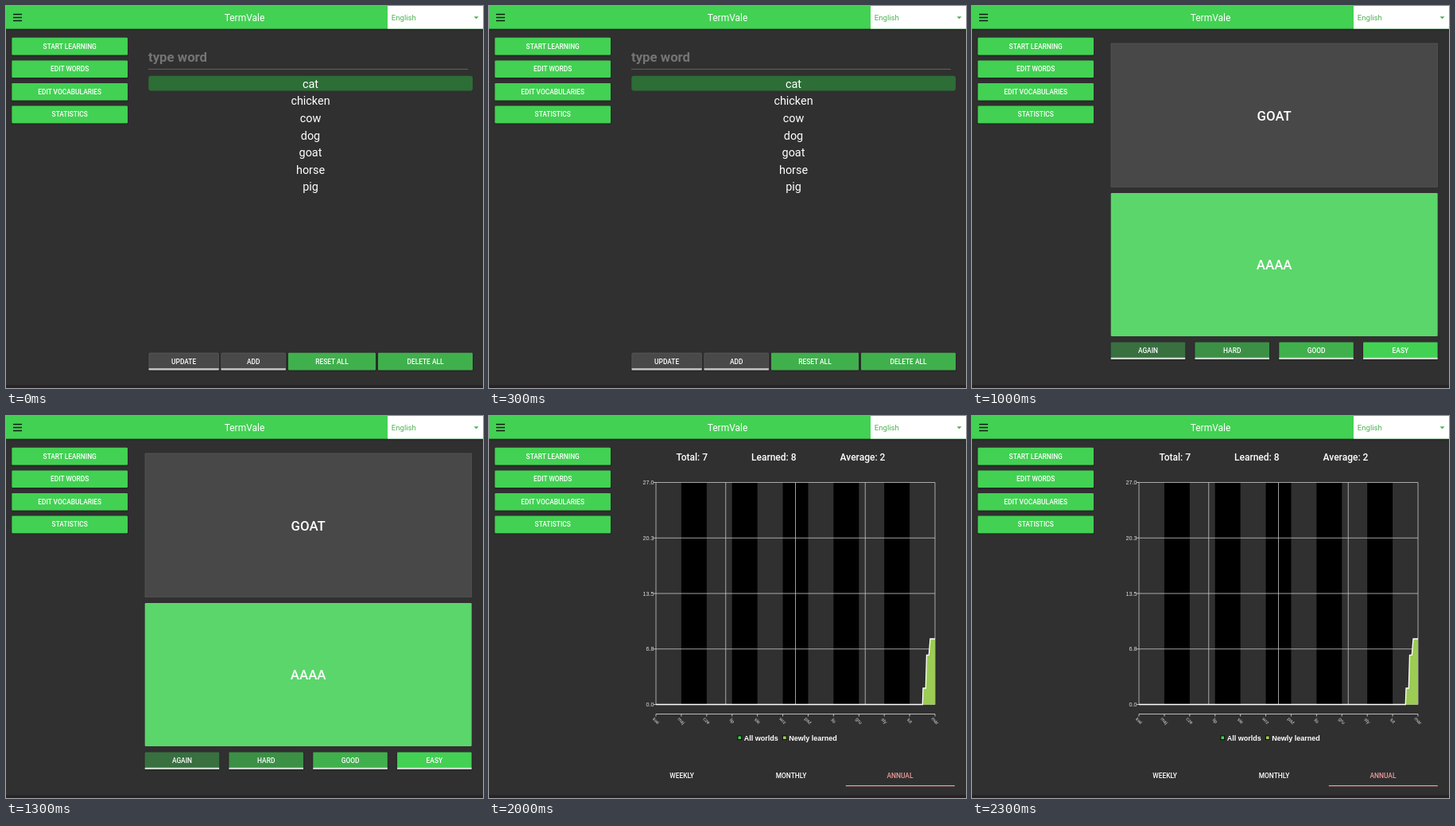
Write an HTML page that moves like this. It is 600 px wide and 480 px high and loops after 2500 ms.

```html
<!DOCTYPE html>
<html lang="en">
<head>
<meta charset="utf-8">
<title>Vocabulary trainer</title>
<style>
  html, body { margin: 0; width: 100%; height: 100%; overflow: hidden; background: #303030; }
  svg { display: block; width: 600px; height: 480px; font-family: Roboto, sans-serif; }
  .scene { visibility: hidden; animation: show 2.5s step-end infinite; }
  @keyframes show {
    0% { visibility: visible; }
    20%, 100% { visibility: hidden; }
  }
  .btn { font-size: 8.4px; font-weight: 500; }
  .list { font-size: 14.4px; }
  .card { font-size: 16.8px; font-weight: 500; }
  .label { font-size: 12px; }
  .field { font-size: 9.6px; }
  .stat { font-size: 12px; font-weight: 500; }
  .bold { font-weight: 700; }
  .axis { font: 7.2px "Liberation Sans", sans-serif; }
  .month { font: 6px "Liberation Sans", sans-serif; }
  .legend { font: bold 9px "Liberation Sans", sans-serif; }
</style>
</head>
<body>
<svg id="stage" viewBox="0 0 600 480">
  <defs>
    <filter id="shade" x="-10%" y="-30%" width="120%" height="180%">
      <feDropShadow dx="0" dy="0.8" stdDeviation="0.9" flood-color="#000" flood-opacity=".4"/>
    </filter>
  </defs>
</svg>
<script>
const GREEN = '#43d153', MID = '#40b04d', DEEP = '#2d6d36';
const GREY = '#484848', PINK = '#ef9a9a', LIME = '#9ccc54';

const rect = (x, y, w, h, fill, r = 0, extra = '') =>
  `<rect x="${x}" y="${y}" width="${w}" height="${h}" rx="${r}" fill="${fill}" ${extra}/>`;
const line = (x1, y1, x2, y2, color = '#7b7b7b', w = 0.7) =>
  `<path d="M${x1} ${y1}L${x2} ${y2}" stroke="${color}" stroke-width="${w}"/>`;
const text = (x, y, s, cls, anchor = 'start', fill = '#fff', extra = '') =>
  `<text x="${x}" y="${y}" class="${cls}" text-anchor="${anchor}" fill="${fill}" ${extra}>${s}</text>`;
const mid = (x, y, s, cls, fill) => text(x, y, s, cls, 'middle', fill);

// Button between x1 and x2, optionally with a coloured bottom edge
function button(x1, x2, y, s, fill, { r = 1.2, edge } = {}) {
  const w = x2 - x1;
  const border = fill === GREY && r < 5
    ? rect(x1 + .4, y + .4, w - .8, 20.8, 'none', r, 'stroke="#565656" stroke-width=".8"') : '';
  return rect(x1, y, w, 21.6, fill, r, 'filter="url(#shade)"') + border +
    (edge ? rect(x1, y + 19.4, w, 2.2, edge, .6) : '') +
    mid((x1 + x2) / 2, y + 13.8, s, 'btn');
}
const pill = (x1, x2, y, s, fill = GREY) => button(x1, x2, y, s, fill, { r: 10.8 });
const arrow = (x, y, fill) => `<path d="M${x - 3} ${y}h6l-3 3z" fill="${fill}"/>`;

function frame() {
  const menu = ['START LEARNING', 'EDIT WORDS', 'EDIT VOCABULARIES', 'STATISTICS'];
  return rect(0, 0, 600, 480, '#303030') +
    rect(0, 476.4, 600, 3.6, '#272225') +
    rect(0, 0, 600, 28.6, GREEN, 0, 'filter="url(#shade)"') +
    rect(480, 0, 120, 28.6, '#fff') +
    [10.5, 14.5, 18.5].map(y => line(9, y, 20, y, '#111', 1.4)).join('') +
    mid(300, 19, 'TermVale', 'label') +
    text(484.8, 18.4, 'English', 'field', 'start', '#4caf50') +
    arrow(591.5, 13.3, '#4caf50') +
    menu.map((s, i) => button(7.4, 153, 39.8 + i * 28.6, s, GREEN)).join('');
}

function words(selected, y, edge) {
  const list = ['cat', 'chicken', 'cow', 'dog', 'goat', 'horse', 'pig'];
  return text(179, 70, 'type word', 'bold', 'start', '#747474', 'font-size="16.8"') +
    line(179, 79.4, 581, 79.4) +
    rect(179.3, 87.8 + selected * 21.6, 407.7, 18.6, DEEP, 3) +
    list.map((s, i) => mid(383, 102.7 + i * 21.6, s, 'list')).join('') +
    button(179.5, 267.8, y, 'UPDATE', GREY, { edge }) +
    button(270.5, 352, y, 'ADD', GREY, { edge: '#ccc' }) +
    button(355, 465, y, 'RESET ALL', MID) +
    button(468, 587, y, 'DELETE ALL', MID);
}

function editor() {
  const row = (y, name, value) => text(179.3, y, name, 'label') +
    text(305, y - 3.4, value, 'field') + line(305, y + 3.7, 587, y + 3.7);
  return words(4, 342.7, PINK) + row(389.5, 'Origin', 'goat') + row(420, 'Translated', 'aaaa') +
    pill(183, 298, 435.8, 'SAVE', PINK) + pill(308, 398, 435.8, 'DELETE') +
    pill(408, 583, 435.8, 'RESET PROGRESS');
}

function cards() {
  const grades = [['AGAIN', '#38703f'], ['HARD', '#3a9045'], ['GOOD', MID], ['EASY', GREEN]];
  return rect(175, 47, 410.4, 180.3, '#484848', 0, 'stroke="#595959" stroke-width=".7"') +
    rect(174.7, 235, 411, 180, '#5bd66b', 1.2) +
    mid(380.2, 143.5, 'GOAT', 'card') + mid(380.2, 331.3, 'AAAA', 'card') +
    grades.map(([s, c], i) => {
      const x = 174.7 + i * 105.8;
      return button(x, x + 93.5, 422.4, s, c, { edge: '#cdd8ce' });
    }).join('');
}

function vocabularies() {
  return rect(174.4, 43.2, 425.6, 40, DEEP, 3) +
    mid(387, 58.4, 'English', 'list bold') + mid(387, 79.8, 'a', 'list') +
    mid(387, 107.6, 'Serbian', 'list bold') + mid(387, 129, 'a', 'list') +
    pill(178, 582, 346.4, 'CLEAR', MID) +
    text(174.4, 393.6, 'Vocabulary:', 'label') + text(174.4, 424.8, 'Description:', 'label') +
    rect(315.7, 378.3, 269.8, 21.6, '#424242', 1.2, 'filter="url(#shade)"') +
    text(320, 392.7, 'English', 'field') + arrow(577, 387.5, '#fff') +
    text(315.7, 421.3, 'a', 'field') + line(315.7, 429, 585.5, 429) +
    pill(178, 309, 440.6, 'UPDATE') + pill(319, 446, 440.6, 'ADD') + pill(456, 582, 440.6, 'DELETE');
}

function statistics() {
  const left = 210, top = 83.5, w = 351, h = 279, right = left + w, base = top + h;
  const months = 'kwi maj cze lip sie wrz paź lis gru sty lut mar'.split(' ');
  const step = w / (months.length - 1);
  let out = mid(255.3, 55.6, 'Total: 7', 'stat') + mid(358.3, 55.6, 'Learned: 8', 'stat') +
    mid(470, 55.6, 'Average: 2', 'stat');
  for (let i = 1; i < 11; i += 2) out += rect(left + i * step, top, step, h, '#000');
  ['27.0', '20.3', '13.5', '6.8', '0.0'].forEach((s, i) => {
    const x = left + i * w / 4, y = top + i * h / 4;
    out += line(left, y, right, y, '#c8c8c8', .8) + line(x, top, x, base, '#c8c8c8', .8) +
      line(left - 3, y, left, y, '#ddd', .8) + text(207.5, y + 2.5, s, 'axis', 'end', '#ddd');
  });
  const steps = `M${left} ${base}H545.3L546 342H549.3L550.5 300.4H553.3L555 280H${right}`;
  out += `<path d="${steps}V${base}z" fill="${LIME}"/>` +
    `<path d="${steps}" fill="none" stroke="#fff" stroke-width="1.3"/>` +
    line(left, 374.5, right, 374.5, '#ddd', .8);
  months.forEach((s, i) => {
    const x = left + i * step;
    out += line(x, 374.5, x, 377.5, '#ddd', .8) +
      text(0, 2, s, 'month', 'middle', '#ddd', `transform="translate(${x} 383) rotate(45)"`);
  });
  [[313, GREEN, 'All worlds'], [369.5, LIME, 'Newly learned']].forEach(([x, c, s]) => {
    out += rect(x, 402, 4.6, 4.6, c, 0, 'stroke="#000" stroke-width=".8"') +
      text(x + 7.8, 407.6, s, 'legend');
  });
  return out + mid(242.6, 454.6, 'WEEKLY', 'btn') + mid(380, 454.6, 'MONTHLY', 'btn') +
    mid(517, 454.6, 'ANNUAL', 'btn', PINK) + line(448.8, 464.7, 585.8, 464.7, PINK, 1.2);
}

const scenes = [words(0, 435.8, '#ccc'), editor(), cards(), vocabularies(), statistics()];
document.getElementById('stage').insertAdjacentHTML('beforeend', frame() + scenes.map((s, i) =>
  `<g class="scene" style="animation-delay:${i * 0.5 - 2.5}s">${s}</g>`).join(''));
</script>
</body>
</html>
```
